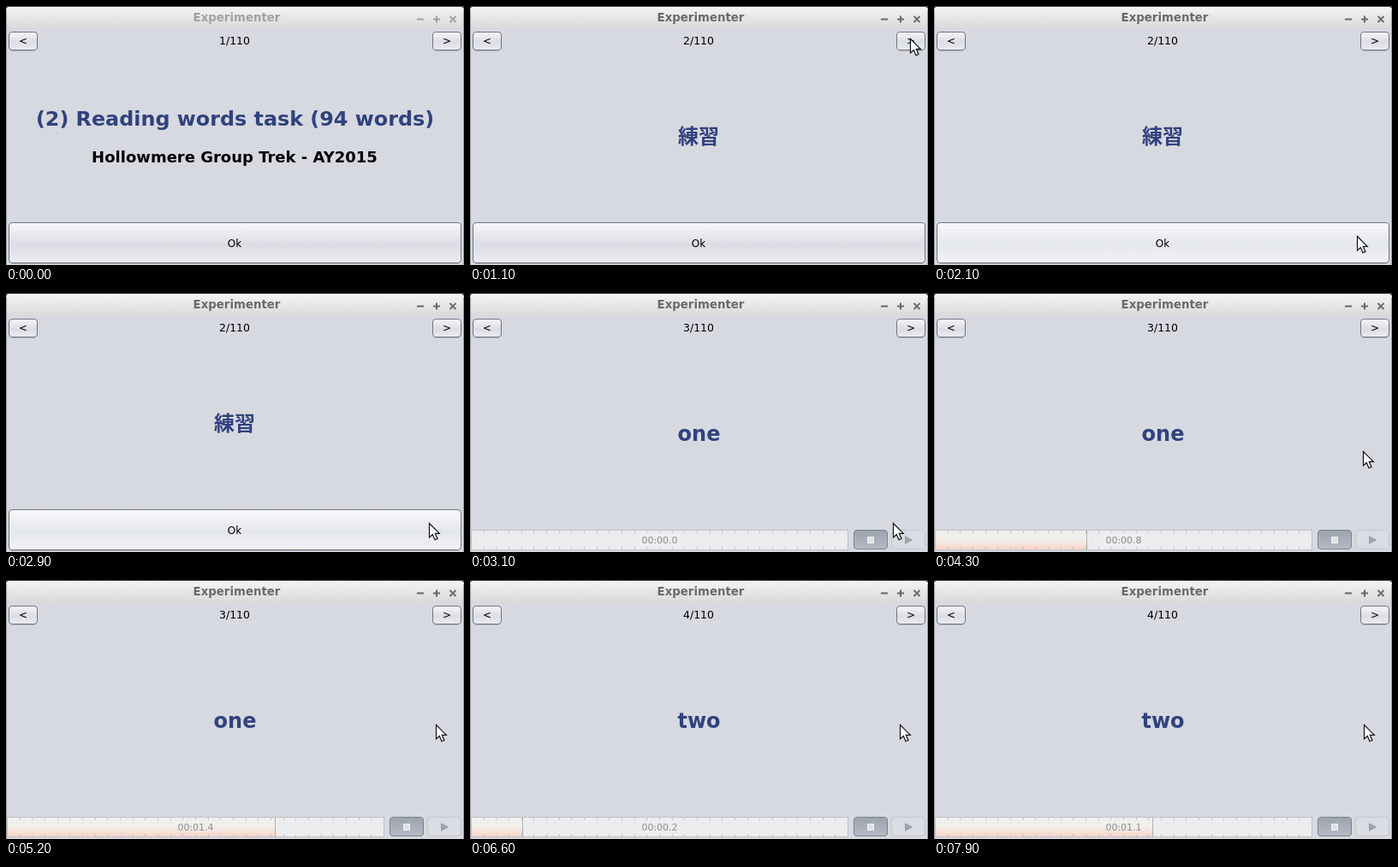
Animation, 535 px wide and 303 px high, one loop 8 s. Source, as an HTML page:

```html
<!DOCTYPE html>
<html lang="en">
<head>
<meta charset="utf-8">
<title>Experimenter</title>
<style>
  html, body { margin: 0; width: 100%; height: 100%; overflow: hidden; background: #d6d9df; }
  svg { display: block; width: 535px; height: 303px; }
  text { font: 12px "DejaVu Sans", sans-serif; text-anchor: middle; }
  .bold { font-weight: bold; }
  #caption { font-size: 13.33px; }
  #counter { font-size: 12.5px; }
  .head { font-size: 24px; fill: #30427f; }
  .long { font-size: 23.85px; }
  .sub { font-size: 18px; }
  .kanji { font-family: "Noto Sans CJK JP", "Noto Sans CJK", sans-serif; }
  #clock { font-size: 11px; fill: #8b8b8b; }
  .btn { fill: url(#face); stroke: #70757f; }
  #ok.hover .btn { fill: url(#lit); }
  .window { --ink: #6a6a6a; }
  .window.idle { --ink: #a2a2a2; }
  #caption { fill: var(--ink); }
  #controls { stroke: var(--ink); stroke-width: 2; fill: none; }
</style>
</head>
<body>
<svg viewBox="0 0 535 303" class="window" id="window">
  <defs>
    <linearGradient id="bar" x2="0" y2="1">
      <stop stop-color="#f4f4f4"/><stop offset="1" stop-color="#d9d9d9"/>
    </linearGradient>
    <linearGradient id="face" x2="0" y2="1">
      <stop stop-color="#f6f7f8"/><stop offset=".55" stop-color="#dadde3"/><stop offset="1" stop-color="#eaecf0"/>
    </linearGradient>
    <linearGradient id="lit" x2="0" y2="1">
      <stop stop-color="#f8f9fa"/><stop offset=".55" stop-color="#e3e6eb"/><stop offset="1" stop-color="#f2f4f7"/>
    </linearGradient>
    <linearGradient id="pressed" x2="0" y2="1">
      <stop stop-color="#9ca2ae"/><stop offset="1" stop-color="#b6bbc6"/>
    </linearGradient>
    <linearGradient id="wave" x2="0" y2="1">
      <stop stop-color="#f9d8cc" stop-opacity="0"/><stop offset="1" stop-color="#f8d3c7"/>
    </linearGradient>
  </defs>

  <rect width="535" height="303" fill="#d6d9df"/>
  <rect width="535" height="8" fill="#3c3c3c"/>
  <path d="M0 27V5Q0 1 4 1H531Q535 1 535 5V27Z" fill="url(#bar)"/>
  <path d="M.5 5V303M534.5 5V303" stroke="#9a9da3"/>
  <text id="caption" class="bold" x="269.5" y="18">Experimenter</text>
  <path id="controls" d="M480 15.5h8M499 15.5h8M503 11.5v8M518.5 12l7 7m0-7l-7 7"/>

  <g id="nav">
    <rect class="btn" x="3.5" y="30.5" width="33" height="21" rx="3.5"/>
    <rect class="btn" x="498.5" y="30.5" width="33" height="21" rx="3.5"/>
    <path d="M6 52.5h28M501 52.5h28" stroke="#b4b8c0"/>
    <text x="20" y="45">&lt;</text>
    <text x="515" y="45">&gt;</text>
  </g>
  <text id="counter" x="267" y="45"></text>

  <g class="page">
    <text class="bold head long" x="267.5" y="140">(2) Reading words task (94 words)</text>
    <text class="bold sub" x="267" y="183">Hollowmere Group Trek - AY2015</text>
  </g>
  <text class="page bold head kanji" x="267" y="161">練習</text>
  <text class="page bold head" x="267.5" y="173">one</text>
  <text class="page bold head" x="267.5" y="173">two</text>

  <g id="ok">
    <rect class="btn" x="3.5" y="253.5" width="528" height="47" rx="3.5"/>
    <path d="M6 301.5H529" stroke="#b4b8c0"/>
    <text x="267" y="282">Ok</text>
  </g>

  <g id="recorder">
    <rect x="1.5" y="277.5" width="440" height="23" fill="#ebedee" stroke="#bfc2c8"/>
    <rect id="done" x="2" y="278" height="22" fill="#f0efeb"/>
    <rect id="tint" x="2" y="288" height="12" fill="url(#wave)"/>
    <path id="ticks" stroke="#c3c4c4"/>
    <path id="head" d="M.5 278V300" stroke="#b0b2b4"/>
    <text id="clock" x="221.5" y="293"></text>
    <rect x="448.5" y="277.5" width="39" height="22" rx="3.5" fill="url(#pressed)" stroke="#7d838f"/>
    <rect x="464.5" y="285.5" width="7" height="7" fill="#dfe1e5" stroke="#f1f2f4"/>
    <rect x="492.5" y="277.5" width="39" height="22" rx="3.5" fill="#d9dce2" stroke="#c3c7ce"/>
    <path d="M508 284V294L517.500 289Z" fill="#9fa3aa"/>
  </g>

  <path id="cursor" d="M.5 .5V17L4.300 13.500L7 19.800L10 18.500L7.300 12.300H12.300Z" fill="#fff" stroke="#111" stroke-width="1.2"/>
</svg>
<script>
const LOOP = 8000, STEP = 100, TAKE = 2, PX_PER_SEC = 220;
const $ = id => document.getElementById(id);
const pages = [...document.querySelectorAll('.page')];

// page start times; takes advance in recorded seconds per ms of playback
const starts = [0, 900, 3100, 6100];
const takes = { 2: { from: 3122, rate: .000687 }, 3: { from: 6190, rate: .000677 } };

// pointer stops: time, x, y
const stops = [
  [300, 534, 150], [700, 514, 38], [1300, 514, 38], [1900, 494, 269],
  [4000, 494, 269], [4400, 502, 169]
];

const show = (el, on) => { el.style.display = on ? '' : 'none'; };
const ease = k => k * k * (3 - 2 * k);

function pointer(t) {
  const i = stops.findIndex(s => s[0] > t);
  if (i < 0) return stops.at(-1).slice(1);
  const [t0, x0, y0] = stops[i - 1], [t1, x1, y1] = stops[i];
  const k = ease((t - t0) / (t1 - t0));
  return [x0 + (x1 - x0) * k, y0 + (y1 - y0) * k].map(Math.round);
}

function drawTake(take, t) {
  const sec = Math.min(TAKE, Math.max(0, (t - take.from) * take.rate));
  const x = Math.round(sec * PX_PER_SEC);
  $('done').setAttribute('width', x);
  $('tint').setAttribute('width', x);
  $('head').setAttribute('transform', `translate(${x})`);
  $('clock').textContent = '00:0' + (Math.floor(sec * 10) / 10).toFixed(1);
}

function draw(t) {
  const page = starts.findLastIndex(s => t >= s);
  pages.forEach((el, i) => show(el, i === page));
  $('counter').textContent = `${page + 1}/110`;
  $('window').classList.toggle('idle', page === 0);

  const take = takes[page];
  show($('ok'), !take);
  show($('recorder'), take);
  if (take) drawTake(take, t);

  const visible = t >= stops[0][0];
  show($('cursor'), visible);
  if (visible) {
    const [x, y] = pointer(t);
    $('cursor').setAttribute('transform', `translate(${x} ${y})`);
    $('ok').classList.toggle('hover', y > 253);
  } else {
    $('ok').classList.remove('hover');
  }
}

let ticks = '';
for (let i = 1; i < 30; i++) {
  const x = Math.round(1 + i * 440 / 30) + .5;
  ticks += `M${x} 278v3M${x} 297v3`;
}
$('ticks').setAttribute('d', ticks);

const begin = performance.now();
function tick() {
  const t = (performance.now() - begin) % LOOP;
  draw(Math.floor(t / STEP) * STEP);
  requestAnimationFrame(tick);
}
tick();
</script>
</body>
</html>
```
